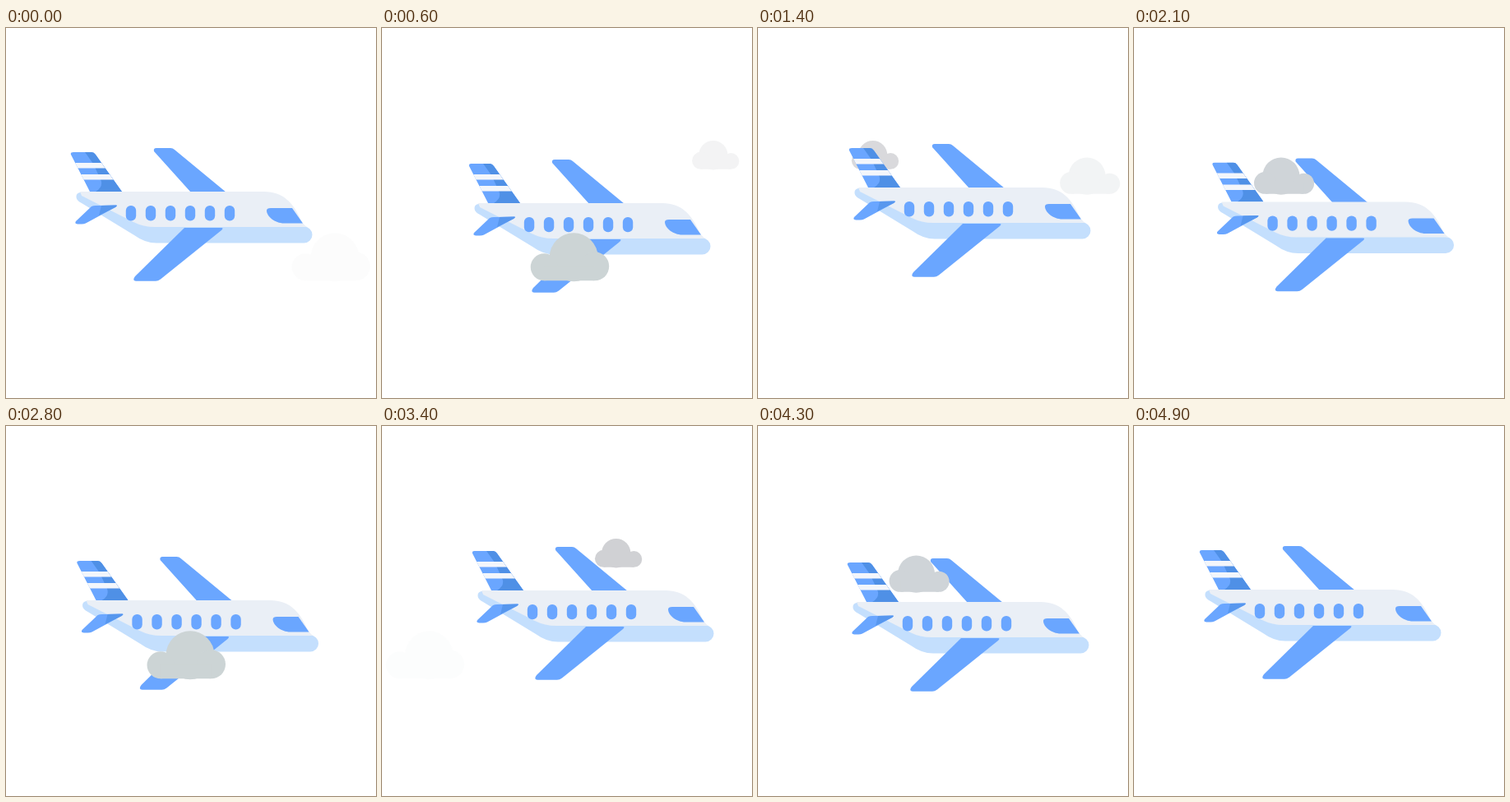
An HTML page for the animation above (5000 ms loop, 450 by 450 pixels).

```html
<!DOCTYPE html>
<html lang="en">
<head>
<meta charset="utf-8">
<title>Plane and clouds</title>
<style>
html, body { margin: 0; height: 100%; overflow: hidden; background: #fff; }
svg { display: block; width: 100%; height: 100%; }
</style>
</head>
<body>
<svg viewBox="0 0 450 450">
  <defs>
    <g id="cloud">
      <circle cx="53" cy="29.5" r="29.5"/>
      <circle cx="17" cy="41.5" r="16.5"/>
      <circle cx="78.5" cy="40.5" r="17.5"/>
      <path d="M17 40H78V58H17Z"/>
    </g>
    <clipPath id="fin">
      <path d="M79 154Q78 151 82 151H104Q107 151 109 154L141 199H102Z"/>
    </clipPath>
  </defs>
  <g id="back"></g>
  <g id="plane" fill="#6aa6ff">
    <path d="M180 150Q179 146 183 146H200Q203 146 205 148L268 200H225Z"/>
    <g clip-path="url(#fin)">
      <path d="M75 150H145V200H75Z"/>
      <path fill="#4f90e6" d="M96 151L106 165L115 184Q119 193 109 199H142V150Z"/>
      <path fill="#f3f6fb" d="M75 164H145V170.500H75ZM75 178H145V184.500H75Z"/>
    </g>
    <path fill="#c4dffd" d="M90 200Q85 201 85.500 206Q86 210 92 213L156 252Q169 261.500 183 261.500H362.500A9.800 9.800 0 0 0 362.500 241.500L180 236L98 200Z"/>
    <path fill="#eaeff6" d="M90 199H314C337 199 349 213 357 230Q360 238 366 242H181Q167 242 155 236L92 204Z"/>
    <path d="M104 217Q106 216 109 216L134 215.500Q136 216 133 218L97 237.500Q95 238.500 92 238.500H87Q83 238 85 235Z"/>
    <path fill="#5797ee" d="M116 216L134 215.500Q136 216 133 218L113 228Z"/>
    <g id="windows"></g>
    <path d="M322 219H348L361 237.500H338C327 237.500 317 229 317 222Q317 219 322 219Z"/>
    <path d="M217 243H262Q265 243 262 246L188 305.500Q185 307.800 182 307.800H158Q153 307 157 302Z"/>
  </g>
  <g id="front"></g>
</svg>
<script>
const LOOP = 5000, BOB = 2500, FADE = 350;
const get = id => document.getElementById(id);
const NS = 'http://www.w3.org/2000/svg';

function add(parent, tag, attrs) {
  const el = document.createElementNS(NS, tag);
  for (const k in attrs) el.setAttribute(k, attrs[k]);
  return parent.appendChild(el);
}

for (let i = 0; i < 6; i++)
  add(get('windows'), 'rect', { x: 145.8 + i * 24, y: 216, width: 12.4, height: 18.4, rx: 6 });

// x: left edge at launch, v: px per ms
const kinds = [
  { layer: 'back', fill: '#d0d1d4', x: 406, y: 137, size: .6, flip: true, v: .329, life: 1170, starts: [513, 2954] },
  { layer: 'front', fill: '#cfd4d8', x: 395, y: 157.5, size: .765, flip: true, v: .316, life: 1270, starts: [1313, 3556] },
  { layer: 'front', fill: '#ccd4d5', x: 352, y: 249.3, size: 1, v: .278, life: 1265, starts: [-17, 2150] }
];
const clouds = kinds.flatMap(k => k.starts.map(start => ({
  ...k, start, el: add(get(k.layer), 'use', { href: '#cloud', fill: k.fill })
})));

// Bobbing path: time, x, y
const path = [
  [-100, 1, 0], [0, 0, 0], [100, -.5, 3], [300, 7.5, 13], [450, 18, 16.3], [600, 27, 14],
  [900, 31, 1], [1200, 33, -14.5], [1400, 32, -5], [1600, 31, 6], [1800, 30, 15],
  [1950, 25, 16], [2300, 5, 6], [2400, 1, 0], [2500, 0, 0], [2600, -.5, 3]
];

function along(t, axis) {
  let i = 1;
  while (path[i + 1][0] <= t) i++;
  const [a, b, c, d] = path.slice(i - 1, i + 3);
  const span = c[0] - b[0], u = (t - b[0]) / span;
  const m = (c[axis] - a[axis]) / (c[0] - a[0]) * span;
  const n = (d[axis] - b[axis]) / (d[0] - b[0]) * span;
  const p = b[axis], q = c[axis];
  return p + u * (m + u * (3 * (q - p) - 2 * m - n + u * (2 * (p - q) + m + n)));
}

function draw(now) {
  const t = now % LOOP, bob = t % BOB;
  get('plane').setAttribute('transform', `translate(${along(bob, 1)} ${along(bob, 2)})`);
  for (const c of clouds) {
    const age = t - c.start;
    const alpha = Math.min(1, age / FADE, (c.life - age) / FADE);
    const left = c.x - c.v * age + (c.flip ? 96 * c.size : 0);
    c.el.setAttribute('opacity', Math.max(0, alpha));
    c.el.setAttribute('transform',
      `translate(${left} ${c.y}) scale(${c.flip ? -c.size : c.size} ${c.size})`);
  }
}

const begin = performance.now();
function tick() {
  draw(performance.now() - begin);
  requestAnimationFrame(tick);
}
tick();
</script>
</body>
</html>
```
